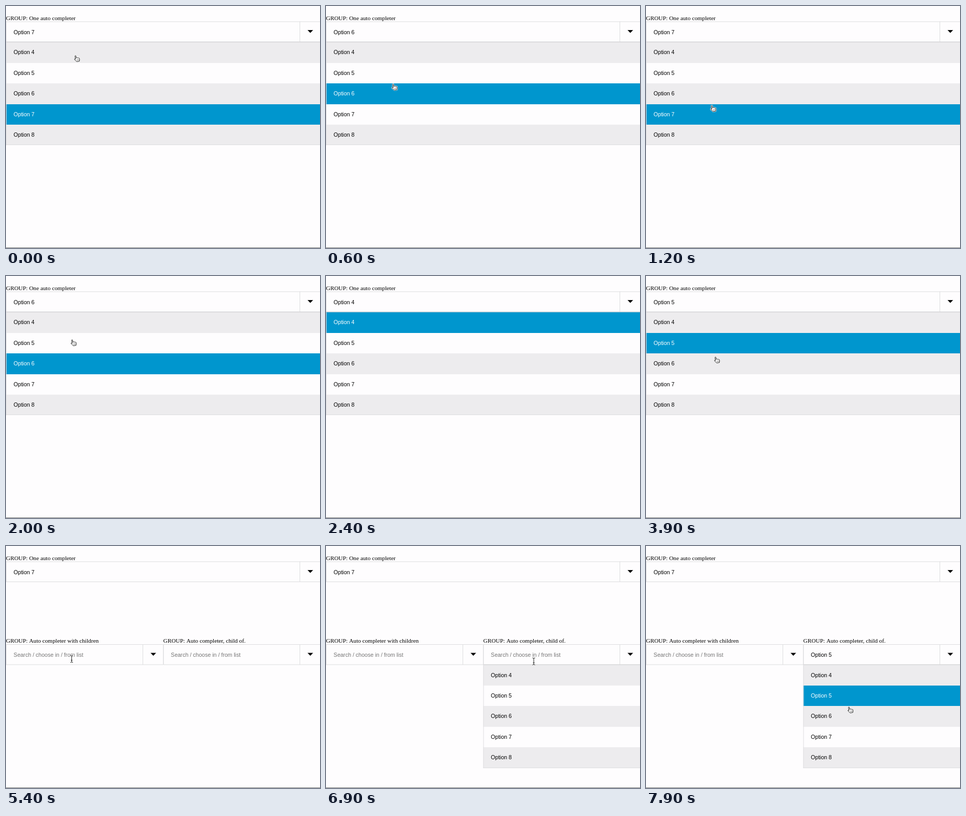
These frames come from a looping animation (600 by 463 pixels, 8 s). An HTML page with a canvas:

```html
<!DOCTYPE html>
<html lang="en">
<head>
<meta charset="utf-8">
<title>Auto completer</title>
<style>
html, body { margin: 0; width: 100%; height: 100%; overflow: hidden; background: #fefdfe; }
canvas { display: block; }
</style>
</head>
<body>
<canvas id="stage" width="600" height="463"></canvas>
<script>
const ctx = document.getElementById('stage').getContext('2d');
const LOOP = 8000, STEP = 100, ROW = 39.4;
const SANS = '10.56px "Liberation Sans", Arial, sans-serif';
const SERIF = '11.27px "Liberation Serif", Times, serif';
const LINE = '#dddddf', BLUE = '#0096ce', STRIPE = '#edecee', PAPER = '#fefdfe';
const HINT = 'Search / choose in / from list';

// [time, selected option]
const topPicks = [[0, 7], [100, 5], [200, 4], [400, 5], [600, 6], [800, 7],
  [1900, 6], [2100, 5], [2200, 4], [2800, 5], [3100, 6],
  [3400, 5], [3600, 4], [3800, 5], [4000, 6], [4100, 7]];
const childPicks = [[0, 0], [7100, 4], [7800, 5]];

// Pointer paths, each a visible stretch of [time, x, y]
const paths = [
  [[0, 132, 94.5], [200, 131, 82], [300, 130, 98], [900, 125, 200], [1200, 125, 190],
    [1700, 125, 190], [2200, 126, 76]],
  [[2500, 128, 82], [3000, 126, 160], [3300, 125, 152], [3600, 130, 92],
    [3900, 132, 154.5], [4200, 131, 222], [4400, 125, 216], [4600, 125, 216]],
  [[5300, 125.5, 216], [5800, 125.5, 216], [6100, 260, 208], [6400, 398, 213],
    [6800, 398, 213], [7300, 393, 252], [7500, 393, 252], [7900, 387, 307.5], [8000, 387, 307.5]]
];

const hand = new Path2D('M3 1.6C3 .2 5 .2 5 1.6V5.2C5.6 4.4 7 4.7 7.1 5.6 7.7 5 9 5.3 9.1 6.2 ' +
  '9.8 5.7 10.9 6.1 10.9 7V9.2C10.9 10.4 10 11 10 12.2H4.6C4.3 10.8 2.2 9.4 1.2 7.7 .6 6.5 1.9 6 2.6 6.8L3.3 7.5Z');
const fingers = new Path2D('M5.8 8.3V10.3M7.4 8.3V10.3M8.9 8.3V10.3');
const beam = new Path2D('M-2.5 -6.8Q0 -6.8 0 -5V5Q0 6.8 -2.5 6.8M2.5 -6.8Q0 -6.8 0 -5M0 5Q0 6.8 2.5 6.8M-1.5 2.5H1.5');

function rect(x, y, w, h, color) {
  ctx.fillStyle = color;
  ctx.fillRect(x, y, w, h);
}

function text(str, x, y, color = '#000', font = SANS) {
  ctx.font = font;
  ctx.fillStyle = color;
  ctx.fillText(str, x, y);
}

function pick(list, t) {
  return list.filter(p => p[0] <= t).pop()[1];
}

function field(title, x, y, right, option) {
  text(title, x, y - 2.6, '#000', SERIF);
  const split = right - 39;
  rect(x, y, right - x, 1, LINE);
  rect(x, y + 38.5, right - x, 1, LINE);
  for (const edge of [x, split, right]) rect(edge, y, 1, 39, LINE);
  text(option ? 'Option ' + option : HINT, x + 14.6, y + 24, option ? '#000' : '#757575');
  const mid = split + 20.5;
  ctx.fillStyle = '#000';
  ctx.beginPath();
  ctx.moveTo(mid - 5.3, y + 16.5);
  ctx.lineTo(mid + 5.3, y + 16.5);
  ctx.lineTo(mid, y + 22);
  ctx.fill();
}

function menu(x, y, selected) {
  for (let i = 0; i < 5; i++) {
    const option = i + 4, on = option === selected;
    const top = Math.round(y + i * ROW), bottom = Math.round(y + (i + 1) * ROW);
    rect(x, top, 600 - x, bottom - top, on ? BLUE : i % 2 ? PAPER : STRIPE);
    text('Option ' + option, x + 14.6, y + i * ROW + 22.9, on ? '#fff' : '#000');
  }
  rect(x, y, 1, 5 * ROW, LINE);
  rect(x, Math.round(y + 5 * ROW) - 1, 600 - x, 1, LINE);
  rect(x, y - 1, 600 - x, 1, '#d0d0d2');
}

function outline(shape, width, color) {
  ctx.lineWidth = width;
  ctx.strokeStyle = color;
  ctx.stroke(shape);
}

function pointer(t) {
  const path = paths.find(p => t >= p[0][0] && t < p[p.length - 1][0]);
  if (!path) return;
  const i = path.findIndex(p => p[0] > t);
  const [t0, x0, y0] = path[i - 1], [t1, x1, y1] = path[i];
  const k = (t - t0) / (t1 - t0);
  const x = x0 + (x1 - x0) * k, y = y0 + (y1 - y0) * k;
  const overText = t > 4600 && y < 227 && (x < 261 || x > 301);
  ctx.save();
  ctx.translate(x, y);
  ctx.lineJoin = 'round';
  if (overText) {
    outline(beam, 2.2, '#fff');
    outline(beam, 1, '#222');
  } else {
    ctx.rotate(-0.15);
    ctx.translate(-3.5, 0);
    outline(hand, 2.2, '#fff');
    ctx.fillStyle = '#fff';
    ctx.fill(hand);
    outline(hand, 0.9, '#111');
    outline(fingers, 0.6, '#333');
  }
  ctx.restore();
}

function draw(t) {
  rect(0, 0, 600, 463, PAPER);
  rect(0, 462, 600, 1, '#7c7c7c');
  const child = pick(childPicks, t);
  field('GROUP: One auto completer', 0, 29.5, 600, pick(topPicks, t));
  if (t < 4600) {
    menu(0, 69.4, pick(topPicks, t));
  } else {
    field('GROUP: Auto completer with children', 0, 188, 300, 0);
    field('GROUP: Auto completer, child of.', 300.5, 188, 600, child);
    if (t >= 6600) menu(300.5, 227.6, child);
  }
  pointer(t);
}

const start = performance.now();
function tick() {
  const t = (performance.now() - start) % LOOP;
  draw(Math.floor(t / STEP) * STEP);
  requestAnimationFrame(tick);
}
tick();
</script>
</body>
</html>
```
